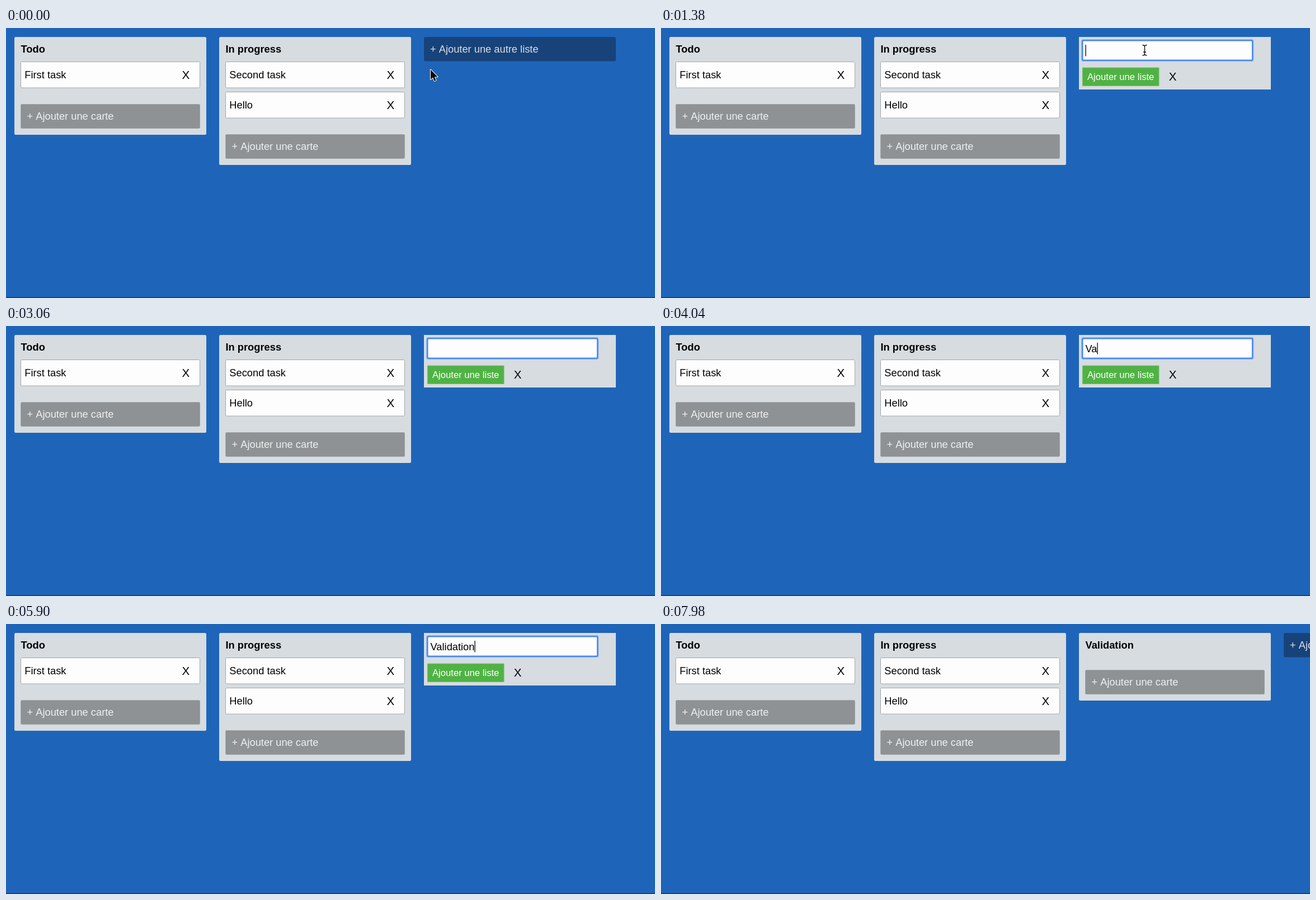
An HTML page with a canvas for the animation above (8000 ms loop, 1160 by 483 pixels).

```html
<!DOCTYPE html>
<html lang="fr">
<head>
<meta charset="utf-8">
<title>Tableau de tâches</title>
<style>
  html, body { margin: 0; width: 100%; height: 100%; overflow: hidden; background: #1e65ba; }
  canvas { display: block; }
</style>
</head>
<body>
<canvas id="stage" width="1160" height="483"></canvas>
<script>
const ctx = document.getElementById('stage').getContext('2d');
const LOOP = 8000, OPEN = 1100, HIDE_POINTER = 2500, SUBMIT = 7260;
const WORD = 'Validation';
const KEYS = [3640, 3860, 4080, 4300, 4520, 5040, 5240, 5440, 5660, 5900];
const ARROW = new Path2D('M0 0V17.6L4.1 13.9 6.8 20.4 9.6 19.2 6.9 12.9H12.5Z');
const HAND = new Path2D(`M-1.6 1.2C-2-.6 .7-1 1.2 .8L2.4 5.4C3-.1 3.4 5.2 4 6.3
  C5 5.2 6 5.6 6.3 6.8C7.3 6.2 8.1 6.8 8.2 8C8.6 11 8 13 6.8 14.6V17.2H-.6
  C-1.4 14.6-3.4 12.4-5.4 10C-6.6 8.4-4.6 7.2-3.2 8.6L-.6 10.4Z`);
const IBEAM = new Path2D('M-4 0Q0 0 0 2.5Q0 0 4 0M0 2V16.5M-4 18.5Q0 18.5 0 16Q0 18.5 4 18.5M-2.5 12.5H2.5');

function box(x, y, w, h, fill, radius = 0, stroke) {
  ctx.beginPath();
  ctx.roundRect(x, y, w, h, radius);
  ctx.fillStyle = fill;
  ctx.fill();
  if (stroke) {
    ctx.strokeStyle = stroke;
    ctx.lineWidth = 1;
    ctx.stroke();
  }
}

function text(str, x, y, { size = 18.3, color = '#000', weight = 400 } = {}) {
  ctx.font = `${weight} ${size}px "Liberation Sans", Arial, sans-serif`;
  ctx.fillStyle = color;
  ctx.fillText(str, x, y);
}

const cross = (x, y) => text('X', x, y, { size: 20.6 });

function list(x, title, cards) {
  const bottom = 82.5 + 54 * cards.length;
  box(x, 16, 343, bottom + 38.5, '#d6dce0', 2.5);
  text(title, x + 11.5, 43.5, { weight: 700 });
  cards.forEach((name, i) => {
    const y = 60 + 54 * i;
    box(x + 11.5, y + .5, 320, 46.5, '#fdfdfd', 2, '#a3a6aa');
    text(name, x + 18.3, y + 29.5);
    cross(x + 299.6, y + 30.5);
  });
  box(x + 11.3, bottom - .3, 320.5, 43.6, '#8f9294', 2);
  text('+ Ajouter une carte', x + 22.5, bottom + 27.5, { color: '#eef0f1' });
}

function addList(x) {
  box(x, 16, 343, 43.5, '#18437a', 2.5);
  text('+ Ajouter une autre liste', x + 11, 43.5, { color: '#d6dde6' });
}

function form(t) {
  const typed = KEYS.filter(k => k <= t).length;
  const word = WORD.slice(0, typed);
  const lastEdit = typed ? KEYS[typed - 1] : OPEN;

  box(747, 16, 343, 94, '#d6dce0');
  box(751, 20, 308.5, 40, '#9dbcf0', 4);
  box(752, 21, 306.5, 38, '#4a8af0', 3);
  box(754.5, 23.5, 301.5, 33, '#fdfdfd', 1);
  text(word, 758.5, 47);
  const caret = 758.5 + ctx.measureText(word).width;
  if (Math.floor((t - lastEdit) / 500) % 2 === 0) box(caret, 30, 1.3, 20.5, '#000');

  box(753.5, 71, 136.5, 32.5, '#50b244', 0, '#76bf70');
  text('Ajouter une liste', 762, 93, { size: 16.65, color: '#fff' });
  cross(907.8, 94.3);
}

function shape(path, x, y, fill, stroke, width) {
  ctx.save();
  ctx.translate(x, y);
  ctx.lineJoin = 'round';
  ctx.strokeStyle = stroke;
  ctx.lineWidth = width;
  ctx.stroke(path);
  if (fill) {
    ctx.fillStyle = fill;
    ctx.fill(path);
  }
  ctx.restore();
}

function pointer(t) {
  if (t >= HIDE_POINTER) return;
  if (t >= OPEN) return shape(IBEAM, 864.5, 30.5, null, '#111', 1.4);
  const p = Math.min(1, Math.max(0, (t - 60) / 760));
  const ease = p * p * (3 - 2 * p);
  const x = 759 + 106 * ease, y = 74.5 - 33.5 * ease;
  if (y < 59.5) shape(HAND, x, y, '#fff', '#111', 2.2);
  else shape(ARROW, x, y, '#0b0b0b', '#fff', 2);
}

function draw(now) {
  const t = now % LOOP;
  box(0, 0, 1160, 483, '#1e65ba');
  box(0, 481.5, 1160, 1.5, '#143c6c');
  list(15, 'Todo', ['First task']);
  list(381, 'In progress', ['Second task', 'Hello']);
  if (t < OPEN) addList(747);
  else if (t < SUBMIT) form(t);
  else {
    list(747, WORD, []);
    addList(1113);
  }
  pointer(t);
}

const start = performance.now();
function tick() {
  draw(performance.now() - start);
  requestAnimationFrame(tick);
}
tick();
</script>
</body>
</html>
```
